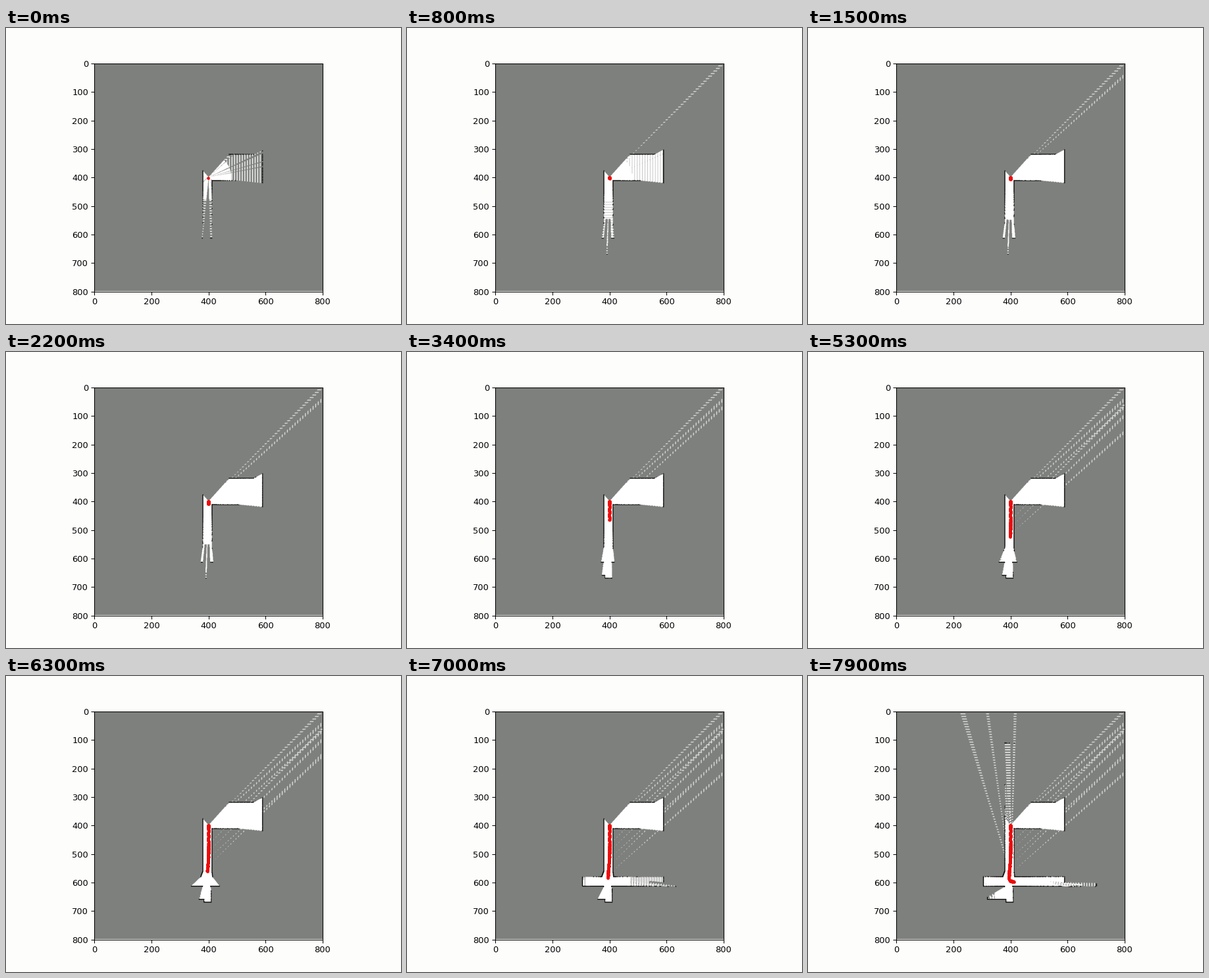
These frames come from a looping animation (600x450 px, 8000 ms). A matplotlib script:

```python
import numpy as np
import matplotlib.pyplot as plt
from matplotlib.animation import FuncAnimation
from matplotlib.colors import LinearSegmentedColormap
from matplotlib.path import Path

FRAMES, STEP, SIZE = 80, 100, 800
WALL, UNKNOWN, FAINT, FREE = 0, 100, 178, 200
FOV, BEAM = 138, 1.0        # half field of view and beam width, degrees
NEAR, REACH = 80, 240       # solid readings, reliable readings
PITCH, DOT = 9, 3           # spacing and length of sparse samples

rng = np.random.default_rng(7)
Y, X = np.mgrid[:SIZE, :SIZE].astype(np.float32)


def box(x0, y0, x1, y1):
    return [(x0, y0), (x1, y0), (x1, y1), (x0, y1)]


corridor = [(379, 112), (414, 112), (411, 400), (411, 560),
            (414, 584), (372, 584), (381, 560), (381, 400)]
room = [(405, 320), (558, 320), (588, 304), (588, 422), (500, 411), (405, 411)]
arm = box(306, 581, 588, 613)
passage = box(580, 600, 700, 614)
door = box(380, 606, 406, 618)
chamber = box(320, 616, 408, 659)
pit = box(385, 655, 408, 669)

cells = np.column_stack([X.ravel(), Y.ravel()])
is_open = np.zeros(SIZE * SIZE, bool)
for shape in (corridor, room, arm, passage, door, chamber, pit):
    is_open |= Path(shape).contains_points(cells)
is_open = is_open.reshape(SIZE, SIZE)


def smooth(u):
    u = np.clip(u, 0, 1)
    return u * u * (3 - 2 * u)


def pose(t):
    """Position and heading: down the corridor, then a left turn."""
    turn = np.clip((t - 70) / 9, 0, 1)
    x = 400 - 5 * smooth((t - 45) / 25) + 17 * turn ** 2
    y = np.interp(t, (0, 22, 34, 53, 70), (400, 408, 465, 523, 585))
    return x, y + 12 * np.sin(turn * np.pi / 2), 90 - 65 * smooth((t - 70) / 8)


def cast(x, y, angles):
    """Distance to the first wall along each beam, and where it is."""
    r = np.arange(SIZE)
    a = np.radians(angles)[:, None]
    px = np.clip(np.rint(x + r * np.cos(a)), 0, SIZE - 1).astype(int)
    py = np.clip(np.rint(y + r * np.sin(a)), 0, SIZE - 1).astype(int)
    dist = np.argmin(is_open[py, px], axis=1)
    k = np.arange(len(dist))
    return dist, px[k, dist], py[k, dist]


def scan(grid, i):
    x, y, heading = pose(i)
    first = heading - FOV
    angles = first + BEAM * np.arange(int(2 * FOV / BEAM) + 1)
    dist, hx, hy = cast(x, y, angles)

    # Long beams seldom return; a few of the others get lost
    k = np.arange(len(angles))
    lost = rng.random(len(k)) < 0.05
    weak = (dist > REACH) & ((k % 4 > 0) | (i < 3))
    hit = ~(lost | weak)
    seen = np.where(weak, 0.6 * REACH * (i >= 3), dist) * ~lost

    dx, dy = X - x, Y - y
    r = np.hypot(dx, dy)
    bearing = (np.degrees(np.arctan2(dy, dx)) - first) % 360
    beam = np.rint(bearing / BEAM).astype(int)
    inside = beam < len(k)
    along = np.where(np.abs(dx) > np.abs(dy), X, Y)
    fixed = along % PITCH < DOT
    shifted = (along + rng.integers(PITCH)) % PITCH < DOT
    sample = np.where(r < REACH, (r < NEAR) | shifted, fixed)

    # Beams at the edge of view sometimes meet nothing at all
    if i % 8 == 3 or first < -85:
        stray = np.abs(bearing - rng.uniform(2, 7)) < BEAM / 2
        grid[stray & fixed & ~is_open & (grid == UNKNOWN)] = FAINT

    clear = inside & is_open & sample
    clear &= r < seen[np.where(inside, beam, 0)]
    grid[clear] = FREE
    for ox in (-1, 0, 1):
        for oy in (-1, 0, 1):
            grid[np.clip(hy[hit] + oy, 0, SIZE - 1),
                 np.clip(hx[hit] + ox, 0, SIZE - 1)] = WALL


maps = []
grid = np.full((SIZE, SIZE), UNKNOWN, np.uint8)
for i in range(FRAMES):
    scan(grid, i)
    maps.append(grid.copy())

ticks = np.arange(0, FRAMES, 0.5)
trail = np.column_stack(pose(ticks)[:2]) + rng.normal(0, 0.6, (len(ticks), 2))

fig, ax = plt.subplots(figsize=(6.4, 4.8), dpi=93.75, facecolor="#fdfefc")
shades = LinearSegmentedColormap.from_list(
    "map", ["black", "#7e807d", "white"])
image = ax.imshow(maps[0], cmap=shades, vmin=WALL, vmax=FREE,
                  extent=(0, SIZE, SIZE, 0))
dots, = ax.plot([], [], "o", color="#ee0a0a", mec="none", ms=3.6)
ax.set(xlim=(0, SIZE), ylim=(SIZE, 0))
ax.set_xticks(range(0, SIZE + 1, 200))
ax.set_yticks(range(0, SIZE + 1, 100))


def draw(i):
    image.set_data(maps[i])
    dots.set_data(*trail[:2 * i + 1].T)


anim = FuncAnimation(fig, draw, frames=FRAMES, interval=STEP,
                     init_func=lambda: draw(0), repeat=True, repeat_delay=0)
plt.show()
```
